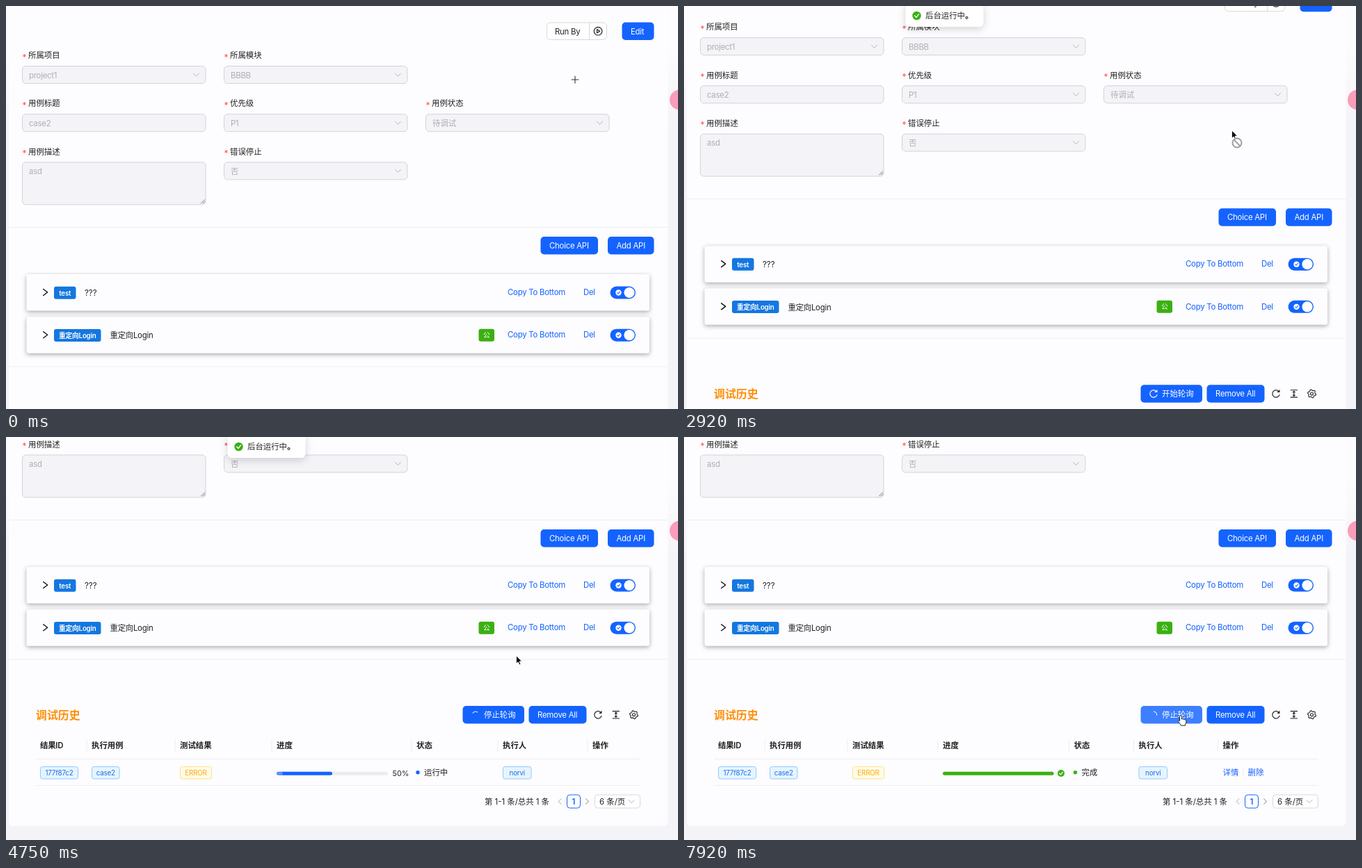
Write an HTML page that moves like this. It is 966 by 580 pixels and loops after 8 s.

```html
<!DOCTYPE html>
<html lang="zh">
<head>
<meta charset="utf-8">
<title>Case run</title>
<style>
html, body { margin: 0; width: 100%; height: 100%; overflow: hidden; background: #fcfcfd; }
svg { display: block; width: 100vw; height: 100vh; }
text { font-family: Inter, "Noto Sans CJK SC", "Noto Sans CJK", "Noto Sans CJK JP", sans-serif; white-space: pre; }
.card { filter: drop-shadow(0 2px 3px rgba(0,0,0,.33)); }
.pop { filter: drop-shadow(0 3px 6px rgba(0,0,0,.17)); }
.line { fill: none; stroke-linecap: round; stroke-linejoin: round; }
</style>
</head>
<body>
<svg id="stage" viewBox="0 0 966 580" preserveAspectRatio="none"></svg>
<script>
const BLUE = '#1463ff', GREEN = '#3bb012', INK = '#222', DIM = '#aeaeb3', EDGE = '#d3d3d7', PAPER = '#fdfcfe';
const LOOP = 8000, STEP = 1000 / 12;

// Drawing helpers; text is placed by its vertical centre.
const text = (x, y, s, { fill = INK, size = 11.4, weight = 400, anchor = 'start', id = '' } = {}) =>
  `<text x="${x}" y="${y + size * .37}" font-size="${size}" font-weight="${weight}" fill="${fill}" text-anchor="${anchor}"` +
  `${id && ` id="${id}"`} letter-spacing="${/[a-z]/i.test(s) ? -.25 : 0}">${s}</text>`;
const box = (x, y, w, h, r, fill, extra = '') =>
  `<rect x="${x}" y="${y}" width="${w}" height="${h}" rx="${r}" fill="${fill}" ${extra}/>`;
const line = (d, stroke, width = 1, extra = '') =>
  `<path class="line" d="${d}" stroke="${stroke}" stroke-width="${width}" ${extra}/>`;
const dot = (x, y, r, fill) => `<circle cx="${x}" cy="${y}" r="${r}" fill="${fill}"/>`;
const group = (id, body, extra = '') => `<g id="${id}" ${extra}>${body}</g>`;
const at = (x, y, body) => `<g transform="translate(${x} ${y})">${body}</g>`;
const rule = (x1, x2, y) => box(x1, y, x2 - x1, 1, 0, '#eeeef0');
const down = (x, y) => line(`M${x - 4} ${y - 2}l4 4.2l4 -4.2`, '#b6b6bb', 1);
const tick = (x, y, r, fill, mark) =>
  dot(x, y, r, fill) + line(`M${x - r * .45} ${y}l${r * .35} ${r * .38}l${r * .58} ${-r * .72}`, mark, r * .24);
const button = (x, y, w, label, dx = 12.5, id = '') =>
  box(x, y, w, 25.5, 5, BLUE, id && `id="${id}"`) + text(x + dx, y + 13, label, { fill: '#fff', id: id && id + 'Label' });
const tag = (x, y, w, label, fill, stroke, ink) =>
  box(x + .5, y - 8.5, w, 17.5, 3, fill, `stroke="${stroke}"`) +
  text(x + .5 + w / 2, y, label, { fill: ink, size: 9.9, anchor: 'middle' });
const blueTag = (x, y, w, label) => tag(x, y, w, label, '#e6f4ff', '#91caff', '#1672e8');

const field = (col, row, label, value, select) => {
  const x = 23.5 + 290 * col, y = 71 + 69.2 * row, tall = label === '用例描述';
  return text(x, y + 2.5, '*', { fill: '#ff4d4f', size: 12 }) + text(x + 8.5, y, label) +
    box(x, y + 15.5, 263.5, tall ? 61 : 25, 5, '#f4f3f8', `stroke="${EDGE}"`) +
    text(x + 9.5, y + 28.3, value, { fill: DIM }) + (select ? down(x + 250, y + 28) : '') +
    (tall ? line(`M${x + 257} ${y + 74.5}l5 -5M${x + 260} ${y + 74.5}l2.5 -2.5`, '#555', .8) : '');
};

const apiCard = (y, name, tagWidth, textX, shared) =>
  box(29.5, y, 895.5, 52.5, 3, PAPER, 'class="card"') +
  line(`M53.7 ${y + 21.5}l6 4.5l-6 4.5`, '#111', 1.4) +
  box(69, y + 17.7, tagWidth, 18, 3, '#1477e0') +
  text(69 + tagWidth / 2, y + 27, name, { fill: '#fff', size: 9.8, weight: 600, anchor: 'middle' }) +
  text(textX, y + 27, shared ? name : '???') +
  (shared ? box(679.5, y + 17.5, 22.5, 18, 3, GREEN) + text(690.8, y + 26.5, '公', { fill: '#fff', size: 9.8, anchor: 'middle' }) : '') +
  text(721, y + 26, 'Copy To Bottom', { fill: BLUE }) + text(830, y + 26, 'Del', { fill: BLUE }) +
  box(868.5, y + 17.5, 36.5, 18, 9, BLUE) + dot(896, y + 26.5, 7.6, '#fff') + tick(880.5, y + 26.5, 4.2, '#fff', BLUE);

const heads = ['结果ID', '执行用例', '测试结果', '进度', '状态', '执行人', '操作'];
const header = xs => heads.map((h, i) =>
  text(xs[i], 643, h, { weight: 600 }) + (i ? box(xs[i] - 7.5, 634, 1, 18, 0, '#eeeef1') : '')).join('');

const gear = Array.from({ length: 24 }, (_, i) => {
  const a = (i * 15 + 7.5) * Math.PI / 180, r = i % 4 < 2 ? 6 : 4.7;
  return `${(r * Math.cos(a)).toFixed(2)} ${(r * Math.sin(a)).toFixed(2)}`;
}).join('L');
const reload = ink => line('M4.4 -2.8A5.2 5.2 0 1 0 5 1.6M4.9 -5.2V-2.5H2.2', ink, 1.2);

const emptyTable = header([49, 101, 277.5, 454, 562, 669, 811]) +
  `<g transform="translate(451.5 700.8) scale(.81)" stroke="#d4d4d8" stroke-width="1.1">
  <ellipse cx="32" cy="33" rx="30" ry="6.5" fill="#f3f3f5" stroke="none"/>
  <path fill="${PAPER}" d="M55 12.8L44.9 1.3Q44 0 42.9 0H21.1Q20 0 19.1 1.3L9 12.8V22H55Z"/>
  <path fill="#fafafb" d="M41.6 16C41.6 14.3 42.6 13 43.8 13H55V31Q55 35 52 35H12Q9 35 9 31V13H20.2C21.4 13 22.4 14.3 22.4 16S23.4 18.9 24.6 18.9H39.4C40.6 18.9 41.6 17.6 41.6 16Z"/></g>` +
  text(477.5, 748, '暂无数据', { fill: '#77777c', anchor: 'middle' }) + rule(43, 912, 796);

const row = (xs, status, dotFill) => header(xs) +
  blueTag(49, 682, 54, '177f87c2') + blueTag(xs[1], 682, 39.5, 'case2') +
  tag(xs[2], 682, 45, 'ERROR', '#fffbe6', '#ffe08a', '#faad14') +
  box(xs[3], 680.7, 160, 5, 2.5, '#ececf0') +
  dot(xs[4] + 2, 681.7, 2.7, dotFill) + text(xs[4] + 11, 681.8, status) +
  blueTag(xs[5], 682, 40.5, 'norvi');
const runXs = [49, 123, 250, 389, 590, 714, 843], doneXs = [49, 123, 242, 372, 560.5, 653.5, 774.5];

const pager = rule(43, 912, 700) + text(688, 723.5, '第 1-1 条/总共 1 条') +
  line('M798 719.7l-4 3.8l4 3.8', '#aaa') + line('M833.5 719.7l4 3.8l-4 3.8', '#888') +
  box(806.5, 714, 19, 19, 4, '#fff', `stroke="${BLUE}"`) + text(816, 723.5, '1', { fill: BLUE, weight: 600, anchor: 'middle' }) +
  box(846.5, 714, 65, 19, 4, '#fff', 'stroke="#d9d9d9"') + text(853, 723.5, '6 条/页') + down(899, 723.5);

const form = box(777.5, 24, 86, 24.5, 5, '#fff', 'stroke="#d9d9d9"') + box(838, 24, 1, 24.5, 0, '#d9d9d9') +
  text(789, 36.3, 'Run By') + line('M845.3 36.2a5.8 5.8 0 1 0 11.6 0a5.8 5.8 0 1 0 -11.6 0M849.6 33.6v5.2l4 -2.6z', INK, 1.2) +
  button(885.5, 23.5, 46, 'Edit') +
  field(0, 0, '所属项目', 'project1', 1) + field(1, 0, '所属模块', 'BBBB', 1) +
  field(0, 1, '用例标题', 'case2') + field(1, 1, '优先级', 'P1', 1) + field(2, 1, '用例状态', '待调试', 1) +
  field(0, 2, '用例描述', 'asd') + field(1, 2, '错误停止', '否', 1);

const history = text(43, 599, '调试历史', { fill: '#ff8f0a', size: 15.9, weight: 700 }) +
  button(656.5, 586, 88.5, '开始轮询', 30.5, 'poll') + button(751.5, 586, 83, 'Remove All', 12.5, 'remove') +
  at(675, 598.8, group('still', reload('#fff')) + group('spin', line('M0 -4.6A4.6 4.6 0 0 1 4.6 0', '#fff', 1.1))) +
  at(851, 598.8, reload(INK)) +
  at(876.8, 598.8, line('M-4.7 -5.2H4.7M-4.7 5.2H4.7M0 -3V3M-1.5 -2L0 -3.6L1.5 -2M-1.5 2L0 3.6L1.5 2', INK, 1.1)) +
  at(902.5, 598.8, line(`M${gear}Z`, INK, 1.1) + line('M-2 0a2 2 0 1 0 4 0a2 2 0 1 0 -4 0', INK, 1.1)) + rule(43, 912, 662);

const page = box(4, -60, 947.5, 880, 6, PAPER, 'id="sheet"') + form + rule(4, 951, 318) +
  button(768.5, 332, 82.5, 'Choice API') + button(865, 332, 66.5, 'Add API') +
  apiCard(386, 'test', 31.5, 113) + apiCard(447.2, '重定向Login', 67.5, 149.5, true) + rule(4, 951, 518.5) + history +
  group('empty', emptyTable) +
  group('run', row(runXs, '运行中', BLUE) + box(389, 680.7, 80, 5, 2.5, BLUE) +
    box(389, 680.7, 0, 5, 2, '#fff', 'id="shine"') + text(555.5, 683, '50%', { size: 10.8 })) +
  group('done', row(doneXs, '完成', GREEN) + box(372, 680.7, 80, 5, 2.5, GREEN, 'id="bar"') + tick(542, 683, 5, GREEN, '#fff') +
    text(774.5, 681.8, '详情', { fill: BLUE }) + box(803.5, 676, 1, 11, 0, '#ececf0') + text(810.5, 681.8, '删除', { fill: BLUE })) +
  group('pager', pager);

const menuItem = (y, s) => line(`M766.5 ${y}h8M771.2 ${y - 3.2}l3.3 3.2l-3.3 3.2`, INK, 1.1) + text(783, y, s);
const menu = box(753, 52, 111, 58.5, 6, '#fff', 'class="pop"') + box(756, 55.5, 105, 26, 3, '#f3f3f5', 'id="itemHover"') +
  menuItem(68.7, '后台运行') + menuItem(94.5, '实时日志运行');
const toast = box(318.5, -5, 112, 35, 6, '#fff', 'class="pop"') + tick(334.5, 14, 6.2, GREEN, '#fff') +
  text(347, 14, '后台运行中') + `<text x="404" y="18.2" font-size="11.4" fill="${INK}" letter-spacing="-5.2">。。</text>`;

const cursors =
  group('cross', line('M-5.5 0H5.5M0 -5.5V5.5', '#fff', 2.4) + line('M-5 0H5M0 -5V5', '#333', 1.1)) +
  group('hand', '<path fill="#fff" stroke="#222" stroke-linejoin="round" d="M0 0c1 0 1.5.7 1.5 1.6V5.2c.3-.9 2.2-.8 2.4.3c.4-.7 2-.5 2.1.6c.5-.5 1.8-.2 1.8 1V9.5c0 1.3-.9 2.2-1.2 3.4V14.2H.4c-.6-1.8-2-3-2.9-4.3c-.7-1-1.3-2.1-.6-2.7c.7-.6 1.4 0 1.6.5V1.6C-1.5.7-1 0 0 0z"/>') +
  group('arrow', '<path stroke="#fff" stroke-width=".9" d="M0 0V11.5L2.6 9l2 4.2l1.9-.9l-2-4.1h3.6z"/>') +
  group('ban', dot(7.5, 18, 8, '#fff') + line('M1 18a6.5 6.5 0 1 0 13 0a6.5 6.5 0 1 0 -13 0M3 13.4l9 9.2', '#9b9b9b', 1.9));

document.getElementById('stage').innerHTML =
  `<defs><linearGradient id="back" x2="0" y2="1"><stop offset=".1" stop-color="#fcfcfe"/><stop offset=".3" stop-color="#f4f3f7"/></linearGradient></defs>` +
  box(0, 0, 966, 580, 0, 'url(#back)') + group('page', page) + dot(968.5, 135, 14.5, '#f99db9') +
  group('menu', menu) + group('toast', toast) + group('pointer', cursors);

const $ = id => document.getElementById(id);
const set = (id, name, value) => $(id).setAttribute(name, value);
const show = (id, on) => set(id, 'display', on ? 'inline' : 'none');
const clamp = v => Math.min(1, Math.max(0, v));
const ramp = (t, start, length) => clamp((t - start) / length);
const easeOut = (p, n = 3) => 1 - (1 - p) ** n;

// Linear interpolation over [time, ...values] keys.
function track(keys, t) {
  const i = keys.findIndex(k => k[0] > t);
  if (i < 0) return keys[keys.length - 1].slice(1);
  if (i === 0) return keys[0].slice(1);
  const a = keys[i - 1], b = keys[i], p = (t - a[0]) / (b[0] - a[0]);
  return a.slice(1).map((v, j) => v + (b[j + 1] - v) * p);
}
const hover = p => `rgb(${20 + 40 * p},${99 + 28 * p},255)`;

const path = [
  [0, 818, 106], [250, 818, 106], [417, 842, 50], [500, 852, 22], [750, 852, 22], [917, 851, 32], [1500, 850, 34],
  [1917, 839, 61], [2170, 839, 61], [2300, 834, 72], [2750, 787.5, 179], [2917, 787.5, 179], [3250, 723, 358],
  [3660, 721, 353], [3833, 717, 338], [3917, 717, 336], [4500, 717, 336], [4667, 724, 322], [5000, 762, 293],
  [5417, 730, 361], [6250, 730, 361], [7000, 797, 366], [7083, 793, 392], [7417, 752, 401], [7583, 715, 402], [7917, 714, 401]
];
const scrollKeys = [[2833, 0], [2917, 41], [3000, 122], [3083, 200], [3167, 252], [3250, 272], [3333, 272], [3500, 266], [3667, 263]];
const ROW = 4080, DONE = 6165, POLL = 3850;

function draw(t) {
  const hasRow = t >= ROW, done = t >= DONE, polling = t >= POLL;
  const [scroll] = hasRow ? [199] : track(scrollKeys, t);
  set('page', 'transform', `translate(0 ${-scroll})`);
  set('sheet', 'height', hasRow ? 819 : 883);
  show('empty', !hasRow);
  show('run', hasRow && !done);
  show('done', done);
  show('pager', hasRow);

  const p = ramp((t - ROW + 4800) % 2400, 480, 1920), e = easeOut(p, 5);
  const left = Math.max(0, 40 * e - 40), right = Math.max(0, 120 * e - 40);
  set('shine', 'x', 389 + left);
  set('shine', 'width', right - left);
  set('shine', 'opacity', .5 * (1 - e));

  set('bar', 'width', 80 + 79.5 * easeOut(ramp(t, DONE - 40, 400), 4));

  show('still', !polling);
  show('spin', polling);
  set('spin', 'transform', `rotate(${t * .36 + 34})`);
  $('pollLabel').textContent = polling ? '停止轮询' : '开始轮询';
  set('poll', 'fill', hover(track([[3750, 0], [3917, .45], [4080, 0], [7417, 0], [7600, 1]], t)[0]));
  set('remove', 'fill', hover(track([[7000, 0], [7200, 1], [7417, 1], [7600, 0]], t)[0]));

  const open = easeOut(ramp(t, 1200, 200)) * (1 - ramp(t, 2170, 200));
  show('menu', open > 0);
  set('menu', 'opacity', open);
  set('menu', 'transform', `translate(0 ${52 * .2 * (1 - open)}) scale(1 ${.8 + .2 * open})`);
  show('itemHover', t >= 1830);

  const note = easeOut(ramp(t, 2330, 300)) * (1 - ramp(t, 5500, 300));
  show('toast', note > 0);
  set('toast', 'opacity', note);
  set('toast', 'transform', `translate(0 ${-35 * (1 - note)})`);

  set('pointer', 'transform', `translate(${track(path, t).join(' ')})`);
  const cross = t < 490, hand = !cross && t < 2250 || t >= 3750 && t < ROW || t >= 7080;
  show('cross', cross);
  show('hand', hand);
  show('arrow', !cross && !hand);
  show('ban', t >= 2740 && t < 2990);
}

function tick12(now) {
  draw(Math.floor((now % LOOP + 5) / STEP) * STEP % LOOP);
  requestAnimationFrame(tick12);
}
tick12(performance.now());
</script>
</body>
</html>
```
